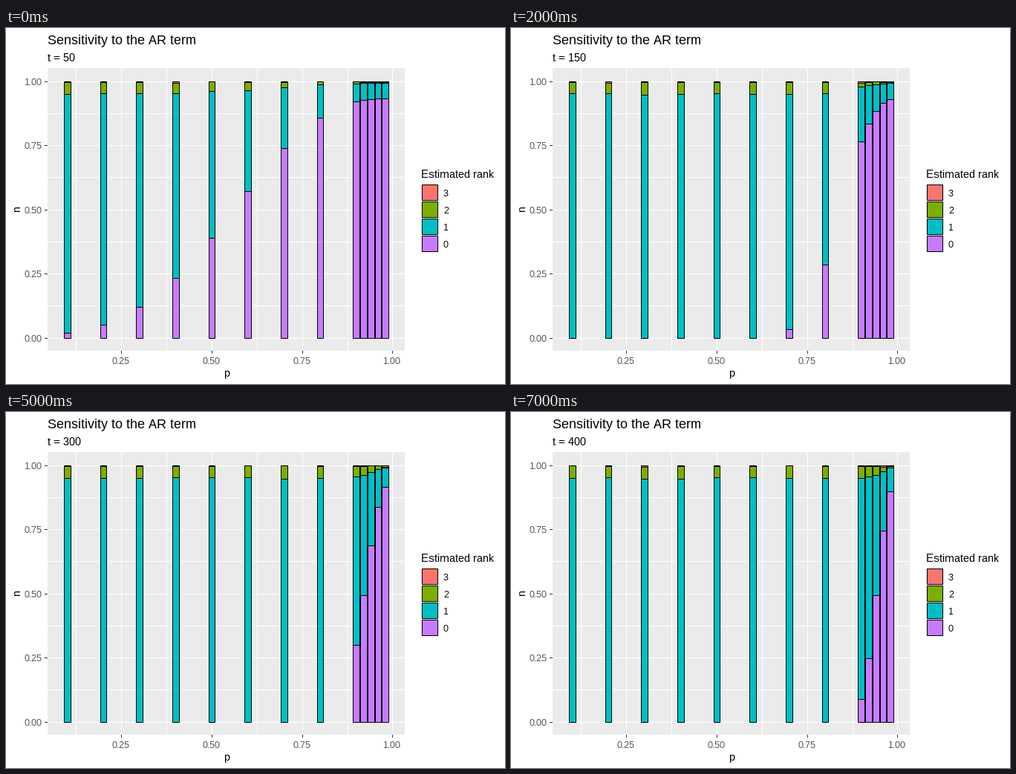
These frames come from a looping animation (672 by 480 pixels, 8000 ms). A matplotlib script:

```python
import math
import random

import matplotlib.pyplot as plt
from matplotlib.animation import FuncAnimation
from matplotlib.patches import Rectangle

plt.rcParams.update({
    "font.family": "Liberation Sans",
    "text.hinting": "native",
    "text.hinting_factor": 1,
    "text.kerning_factor": 6,  # whole-pixel advances, no kerning
})

W, H, DPI = 672, 480, 96
PX = 72 / DPI  # points per pixel
LEFT, RIGHT, TOP, BOTTOM = 56, 537, 54, 435

COLORS = ["#C77CFF", "#00BFC4", "#7CAE00", "#F8766D"]  # rank 0 to 3
P = [i / 10 for i in range(1, 10)] + [.92, .94, .96, .98]
TIMES = range(50, 401, 50)
DRAWS = 500


def col(p):
    return math.floor(34.05 + 486.9 * p)


def row(share):
    return math.floor(418.2 - 346 * share)


def levels(t, p, rng):
    """Cumulative shares of ranks 0 to 3, from 0 up to 1."""
    # Rank 0 depends on the distance from a unit root, scaled by sample size
    distance = t * (1 - p) / (29 - 130 / t)
    rank0 = .935 * math.exp(-distance ** 2.55)
    rank0 = math.floor(rank0 * DRAWS) / DRAWS
    rank01 = .951 + .048 * rank0 ** 2 + rng.gauss(0, .003) * (1 - rank0)
    rank3 = rng.choice([0, .003, .003, .003, .006])
    return [0, rank0, rank01, max(rank01, 1 - rank3), 1]


rng = random.Random(4)
stacks = {t: [levels(t, p, rng) for p in P] for t in TIMES}

fig = plt.figure(figsize=(W / DPI, H / DPI), dpi=DPI, facecolor="white")
ax = fig.add_axes([0, 0, 1, 1])
ax.set_xlim(0, W)
ax.set_ylim(H, 0)
ax.axis("off")


def box(x, y, w, h, color):
    ax.add_patch(Rectangle((x, y), w, h, fc=color, lw=0, snap=False))


def outlined(x0, y0, x1, y1, color):
    """Filled box with a one pixel black outline on the given pixels."""
    rect = Rectangle((x0 + .5, y0 + .5), x1 - x0, y1 - y0, fc=color,
                     ec="black", lw=PX, snap=False)
    return ax.add_patch(rect)


def label(x, y, s, size=15, color="black", **kw):
    kw = {"ha": "left", "va": "baseline", **kw}
    return ax.text(x, y, s, fontsize=size * PX, color=color, **kw)


# Panel, grid, ticks and tick labels
box(LEFT, TOP, RIGHT - LEFT, BOTTOM - TOP, "#EBEBEB")
for i in range(9):
    v = i / 8
    box(LEFT, row(v), RIGHT - LEFT, 1, "white")
    if i:
        box(col(v), TOP, 1, BOTTOM - TOP, "white")
    if i % 2 == 0:
        box(LEFT - 4, row(v), 4, 1, "#333333")
        label(25, row(v) + 5, f"{v:.2f}", 12, "#4D4D4D")
        if i:
            box(col(v), BOTTOM, 1, 4, "#333333")
            label(col(v) - 12, 453, f"{v:.2f}", 12, "#4D4D4D")

label(56, 22, "Sensitivity to the AR term", 18)
subtitle = label(56, 45, "")
label(293, 470, "p")
label(15, 244, "n", ha="center", va="center", rotation=90)

# Legend
label(559, 202, "Estimated rank")
box(559, 211, 24, 92, "#F2F2F2")
for i, rank in enumerate([3, 2, 1, 0]):
    y = 211 + 23 * i
    outlined(560, y, 581, y + 21, COLORS[rank])
    label(589, y + 16, str(rank), 12)

bars = [[outlined(col(p - .009), 0, col(p + .009), 0, c) for c in COLORS]
        for p in P]


def draw(i):
    t = TIMES[i]
    subtitle.set_text(f"t = {t}")
    for parts, marks in zip(bars, stacks[t]):
        for part, lo, hi in zip(parts, marks, marks[1:]):
            part.set_visible(hi > lo)
            part.set_y(row(hi) + .5)
            part.set_height(row(lo) - row(hi))
    return []


anim = FuncAnimation(fig, draw, frames=len(TIMES), interval=1000,
                     repeat=True, repeat_delay=0, blit=False)
plt.show()
```
